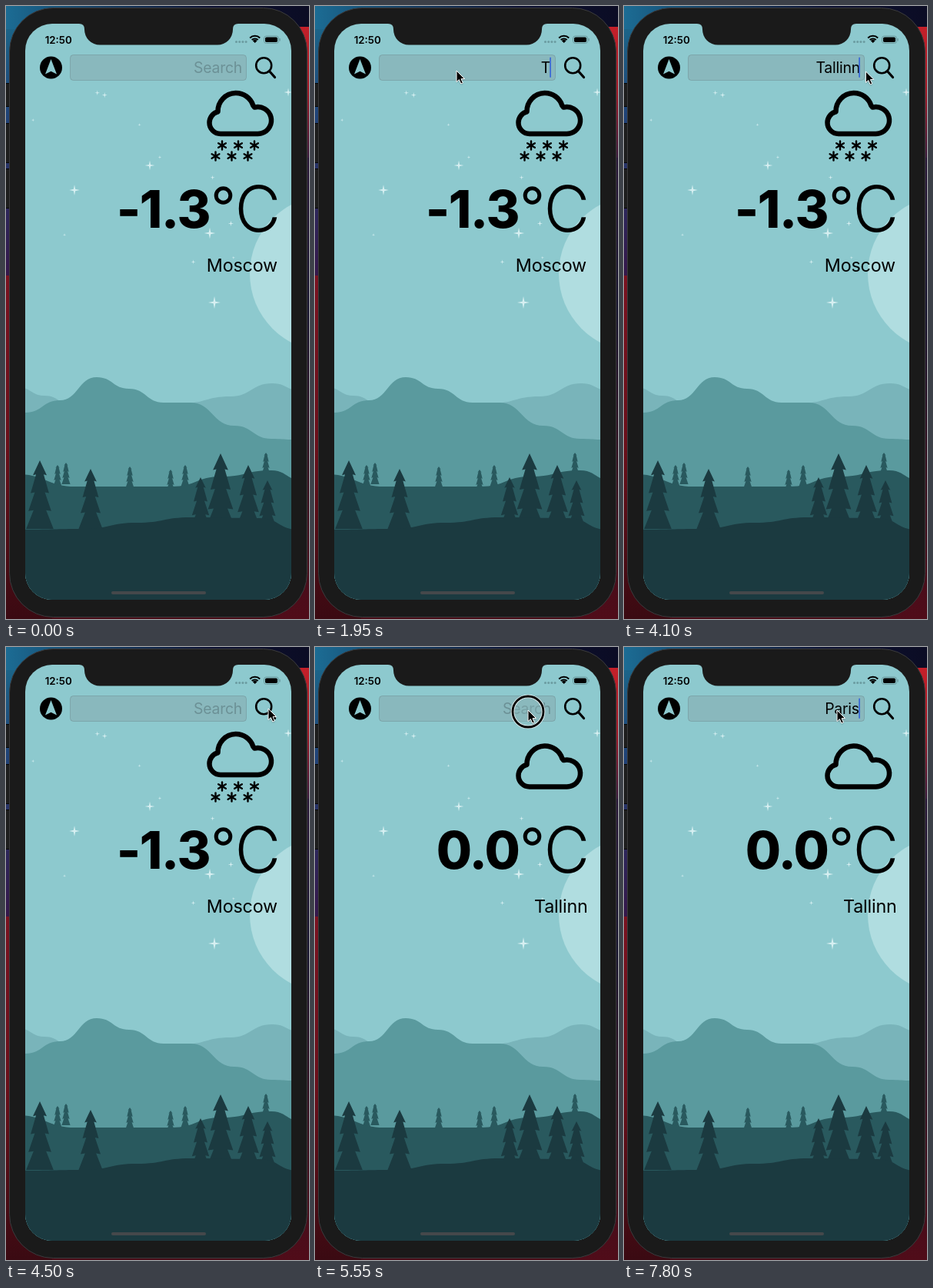
Recreate the animation shown at these times as an HTML page with a canvas. Size 394 by 796 pixels, loop 8000 ms.

```html
<!DOCTYPE html>
<html lang="en">
<head>
<meta charset="utf-8">
<title>Weather app</title>
<style>
  html, body { margin: 0; width: 100%; height: 100%; overflow: hidden; background: #12101c; }
  canvas { display: block; width: 394px; height: 796px; }
</style>
</head>
<body>
<canvas id="stage"></canvas>
<script>
const W = 394, H = 796, LOOP = 8000;
const canvas = document.getElementById('stage');
const ctx = canvas.getContext('2d');
const ratio = window.devicePixelRatio || 1;
canvas.width = W * ratio;
canvas.height = H * ratio;

const FONT = 'Inter, Roboto, "Liberation Sans", sans-serif';
const SKY = '#8dc9ce', FAR = '#79b4ba', MOUNTAIN = '#5a9a9e', HILL = '#29595e', DARK = '#1b3a40';
const BODY = '#1a1a1a', BLACK = '#000';
const PI = Math.PI;

// Tips of the main stars and trees; sizes follow from them.
const BRIGHT = [[89, 239], [187, 207], [265, 295], [271, 385], [367, 112]];
const FAR_TREES = [[67, 596], [78, 593], [161, 598], [214, 602], [233, 596], [338, 580]];
const NEAR_TREES = [[44, 590], [110, 601], [253, 612], [279, 581], [315, 596], [340, 616]];

const KEY_GAP = 250, PRESS = 100, RESULT_AT = 4650;
const SEARCHES = [
  { focus: 1100, key: 1850, word: 'Tallinn', end: 4430 },
  { focus: 5700, key: 6650, word: 'Paris', end: LOOP }
];
const CLICKS = [1000, 4330, 5540];
const MOVES = [
  { start: 250, end: 850, from: [398, 300], to: [184, 84], bow: 0 },
  { start: 3850, end: 4190, from: [184, 84], to: [341, 80], bow: 7.5 },
  { start: 4900, end: 5480, from: [341, 80], to: [277, 82], bow: 4 }
];

const clamp = v => Math.max(0, Math.min(1, v));
const mix = (a, b, p) => a + (b - a) * p;
const ease = p => p * p * (3 - 2 * p);
const ramp = (t, start, time) => clamp((t - start) / time);

function seeded(seed) {
  return () => (seed = (seed * 16807) % 2147483647) / 2147483647;
}

function fill(color) {
  ctx.fillStyle = color;
  ctx.fill();
}

function stroke(width, color) {
  ctx.lineWidth = width;
  ctx.strokeStyle = color;
  ctx.stroke();
}

function box(x, y, w, h, r, color, edge) {
  ctx.beginPath();
  ctx.roundRect(x, y, w, h, r);
  if (color) fill(color);
  if (edge) stroke(1, edge);
}

function circle(x, y, r) {
  ctx.beginPath();
  ctx.arc(x, y, r, 0, PI * 2);
}

function disc(x, y, r, color) {
  circle(x, y, r);
  fill(color);
}

function ring(x, y, r, width, color) {
  circle(x, y, r);
  stroke(width, color);
}

function polygon(points, color) {
  ctx.beginPath();
  points.forEach(([x, y]) => ctx.lineTo(x, y));
  ctx.closePath();
  fill(color);
}

function line(x1, y1, x2, y2, width) {
  ctx.beginPath();
  ctx.moveTo(x1, y1);
  ctx.lineTo(x2, y2);
  stroke(width, BLACK);
}

// Right-aligned on the visible edge of the last glyph.
function label(text, right, base, weight, size, color = BLACK, spacing = 0) {
  ctx.font = `${weight} ${size}px ${FONT}`;
  ctx.letterSpacing = spacing + 'px';
  ctx.fillStyle = color;
  ctx.fillText(text, right - ctx.measureText(text).actualBoundingBoxRight, base);
}

// Terraced ridge: level at each point, smooth slopes between.
function ridge(color, ...points) {
  ctx.beginPath();
  ctx.moveTo(points[0][0], 780);
  ctx.lineTo(...points[0]);
  points.slice(1).forEach(([x, y], i) => {
    const [px, py] = points[i], mid = (px + x) / 2;
    ctx.bezierCurveTo(mid, py, mid, y, x, y);
  });
  ctx.lineTo(points[points.length - 1][0], 780);
  fill(color);
}

function tree(x, top, height, color) {
  const half = height * 0.2, tiers = 4, side = [[0, top]];
  for (let i = 1; i <= tiers; i++) {
    const y = top + height * i / tiers - (tiers - i);
    const w = half * (0.34 + 0.66 * i / tiers);
    side.push([w, y]);
    if (i < tiers) side.push([w * 0.55, y - 1]);
  }
  const mirror = side.slice(1).reverse().map(([w, y]) => [-w, y]);
  polygon([...side, ...mirror].map(([w, y]) => [x + w, y]), color);
}

function star(x, y, r) {
  const points = [];
  for (let i = 0; i < 8; i++) {
    const a = i * PI / 4, d = i % 2 ? r * 0.24 : r;
    points.push([x + Math.cos(a) * d, y + Math.sin(a) * d]);
  }
  polygon(points, '#d6eff1');
}

function drawStars() {
  BRIGHT.forEach(([x, y]) => star(x, y, 4.5 + y * 0.009));
  const rand = seeded(77);
  for (let i = 0; i < 10; i++) star(mix(35, 300, rand()), mix(105, 440, rand()), mix(1.8, 3.6, rand()));
}

function strip(x, y, w, h, ...colors) {
  const g = w > h ? ctx.createLinearGradient(x, 0, x + w, 0) : ctx.createLinearGradient(0, y, 0, y + h);
  colors.forEach((c, i) => g.addColorStop(i / (colors.length - 1), c));
  ctx.fillStyle = g;
  ctx.fillRect(x, y, w, h);
}

function drawDesktop() {
  strip(0, 0, W, 60, '#1c6c94', '#133a60', '#0d1233', '#0b0c24');
  strip(0, 30, 60, 320, '#1c6488', '#1f4478', '#2b2a5e', '#35174a');
  strip(0, 350, 60, 446, '#7a1220', '#6a0f1a', '#3a0a12');
  strip(334, 27, 60, 170, '#c4202a', '#a01a28', '#3a1b3c');
  strip(334, 197, 60, 599, '#2a1838', '#17142e', '#35101f', '#500c19');
  strip(60, 780, 274, 16, '#480b16', '#480b16');
}

function drawPhone() {
  [[100, 30], [152, 51], [211, 51]].forEach(([y, h]) => box(-3, y + 0.5, 9, h, 1, '#1d1d1d', '#050505'));
  box(4.5, 2.5, 387, 791, 57, BODY, '#3b3b3d');
}

function drawScenery() {
  ctx.fillStyle = SKY;
  ctx.fillRect(25, 23, 346, 748);
  disc(418, 347.5, 101, '#b0dde0');
  drawStars();
  ridge(FAR, [15, 495], [50, 506], [90, 520]);
  ridge(FAR, [228, 516], [292, 507], [346, 490], [385, 500]);
  ridge(MOUNTAIN, [25, 528], [70, 512], [118, 482], [160, 497], [205, 515], [240, 515],
    [297, 545], [345, 562], [375, 563]);
  FAR_TREES.forEach(([x, y]) => tree(x, y, 28, HILL));
  ridge(HILL, [15, 608], [90, 624], [215, 624], [280, 611], [345, 603], [385, 616]);
  NEAR_TREES.forEach(([x, y]) => tree(x, y, 679 - y, DARK));
  ridge(DARK, [25, 680], [100, 679], [170, 671], [240, 664], [330, 665], [380, 680]);
  box(137, 760, 123, 4, 2, '#45484b');
}

function drawNotch() {
  ctx.beginPath();
  ctx.moveTo(95, 22);
  ctx.lineTo(95, 23);
  ctx.quadraticCurveTo(102, 23, 102, 30);
  ctx.arcTo(102, 50.5, 124, 50.5, 20);
  ctx.arcTo(295, 50.5, 295, 30, 20);
  ctx.lineTo(295, 30);
  ctx.quadraticCurveTo(295, 23, 302, 23);
  ctx.lineTo(302, 22);
  fill(BODY);
}

function drawStatus() {
  label('12:50', 86, 48.5, 600, 13.3);
  for (let i = 0; i < 4; i++) disc(299.5 + i * 4.2, 46.5, 1.5, '#6b9ca1');
  ctx.lineCap = 'butt';
  for (let i = 0; i < 3; i++) {
    ctx.beginPath();
    ctx.arc(323.7, 48, 2 + i * 3.6, -PI * 0.75, -PI * 0.25);
    stroke(i ? 2 : 4, BLACK);
  }
  box(335.5, 39, 19, 9.5, 3, null, '#6a989d');
  box(337, 40.5, 16, 6.5, 1.8, BLACK);
  box(355.5, 42, 1.2, 3.5, 0.6, '#6a989d');
}

function drawField(t) {
  box(83.5, 63.5, 229, 33, 4, 'rgba(120,125,130,0.23)', 'rgba(90,100,105,0.28)');
  const search = SEARCHES.find(s => t >= s.focus && t < s.end);
  const typed = search ? Math.max(0, Math.floor((t - search.key) / KEY_GAP) + 1) : 0;
  const text = typed ? search.word.slice(0, typed) : '';
  label(text || 'Search', 305.8, 87.3, 400, 19.4, text ? BLACK : '#6c9196', -0.2);
  if (!search) return;

  // The caret blinks off while idle and returns with the first key.
  const { focus, key } = search;
  ctx.globalAlpha = ramp(t, focus, 100) - ramp(t, focus + 400, 100) + ramp(t, key, 100);
  box(305.2, 66.5, 1.8, 26.5, 0.9, '#3c6bd6');
  ctx.globalAlpha = 1;
}

function drawIcons() {
  disc(58.5, 80, 14.5, BLACK);
  polygon([[58.5, 69], [66, 88.5], [58.5, 84.8], [51, 88.5]], SKY);
  ctx.lineCap = 'round';
  ring(335.2, 77.2, 10, 2.6, BLACK);
  line(342.6, 84.8, 349.5, 92.5, 3.2);
}

function drawCloud(dy) {
  ctx.beginPath();
  ctx.arc(279, 167 + dy, 14.5, PI / 2, PI * 1.4);
  ctx.arc(299, 152 + dy, 23.5, PI * 0.99, PI * 1.9);
  ctx.arc(327.5, 164 + dy, 17.5, -PI * 0.58, PI / 2);
  ctx.closePath();
  ctx.lineJoin = 'round';
  stroke(6.5, BLACK);
}

function flake(x, y) {
  for (let i = 0; i < 3; i++) {
    const a = PI * (0.5 + i / 3), dx = Math.cos(a) * 5.6, dy = Math.sin(a) * 5.6;
    line(x - dx, y - dy, x + dx, y + dy, 2.4);
  }
}

function drawWeather(t) {
  const loaded = t >= RESULT_AT;
  drawCloud(loaded ? 0 : -15.5);
  if (!loaded) {
    for (let i = 0; i < 3; i++) {
      flake(281 + i * 21, 181);
      flake(272.5 + i * 21, 195);
    }
  }
  label(loaded ? '0.0' : '-1.3', 264.5, 288, 800, 67, BLACK, -1.5);
  ring(282.5, 246, 9.3, 5, BLACK);
  label('C', 352.5, 293, 300, 82);
  label(loaded ? 'Tallinn' : 'Moscow', 353, 345.4, 400, 23.3, BLACK, -0.2);
}

function drawArrow(x, y) {
  ctx.save();
  ctx.translate(x, y);
  ctx.shadowColor = 'rgba(0,0,0,0.35)';
  ctx.shadowBlur = 2 * ratio;
  ctx.shadowOffsetY = ratio;
  polygon([[0, 0], [0, 14.6], [3.4, 11.6], [5.8, 17], [8.4, 15.9], [6, 10.7], [10.5, 10.5]], BLACK);
  ctx.shadowColor = 'transparent';
  stroke(1, '#fff');
  ctx.restore();
}

function drawPointer(t) {
  const move = MOVES.filter(m => m.start <= t).pop();
  if (!move) return;
  const { start, end, from, to, bow } = move;
  const p = ease(ramp(t, start, end - start));
  const x = mix(from[0], to[0], p);
  const y = mix(from[1], to[1], p) + bow * 4 * p * (1 - p);
  if (CLICKS.some(at => t >= at && t < at + PRESS)) {
    disc(x, y + 2, 20, 'rgba(141,185,190,0.35)');
    ring(x, y + 2, 20, 4.6, '#e6f0f1');
    ring(x, y + 2, 20, 2.8, BLACK);
  }
  drawArrow(x, y);
}

function draw(t) {
  ctx.setTransform(ratio, 0, 0, ratio, 0, 0);
  drawDesktop();
  drawPhone();
  ctx.save();
  ctx.beginPath();
  ctx.roundRect(25, 23, 346, 748, 35);
  ctx.clip();
  drawScenery();
  drawStatus();
  drawField(t);
  drawIcons();
  drawWeather(t);
  ctx.restore();
  drawNotch();
  drawPointer(t);
}

const begin = performance.now();
function tick() {
  draw((performance.now() - begin) % LOOP);
  requestAnimationFrame(tick);
}
tick();
</script>
</body>
</html>
```
